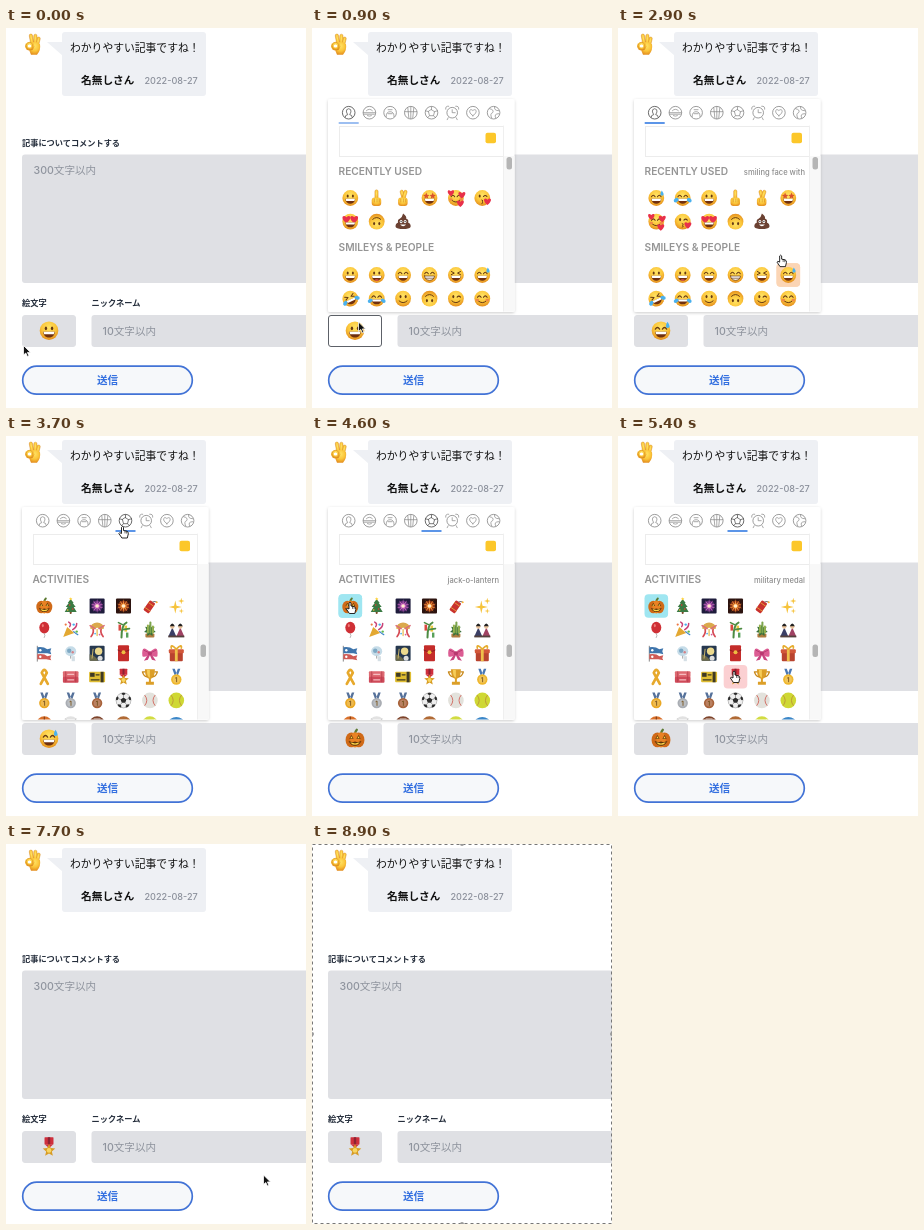
An HTML page for the animation above (9000 ms loop, 300 by 380 pixels).

```html
<!DOCTYPE html>
<html lang="ja">
<head>
<meta charset="utf-8">
<style>
html, body { margin: 0; width: 100%; height: 100%; overflow: hidden; background: #fff; }
svg { display: block; width: 300px; height: 380px; }
text { font-family: Inter, "Noto Sans CJK JP", "Noto Sans CJK", sans-serif; }
.medium { font-weight: 500; }
.bold { font-weight: 700; }
</style>
</head>
<body>
<svg id="stage" viewBox="0 0 300 380">
  <defs>
    <radialGradient id="skin" cx=".5" cy=".32" r=".7">
      <stop offset="0" stop-color="#ffe365"/><stop offset=".55" stop-color="#fbc539"/><stop offset="1" stop-color="#e28a1c"/>
    </radialGradient>
    <filter id="shadow" x="-10%" y="-10%" width="120%" height="120%">
      <feDropShadow dx="0" dy="1" stdDeviation="1.6" flood-opacity=".2"/>
    </filter>
    <clipPath id="panel"><rect x="16" y="71" width="187" height="212.5"/></clipPath>
  </defs>
  <path d="M41 14H57V28Z" fill="#eef0f4"/>
  <rect x="56" y="4" width="144" height="64" rx="3" fill="#eef0f4"/>
  <g id="ok"></g>
  <text class="medium" x="64" y="24" font-size="10.8" fill="#111">わかりやすい記事ですね！</text>
  <text class="bold" x="75" y="55.5" font-size="10.7" fill="#111">名無しさん</text>
  <text class="medium" x="138.5" y="55.5" font-size="9.1" fill="#8b909b">2022-08-27</text>
  <g class="bold" font-size="8.2" fill="#252e3c">
    <text x="16" y="118.3">記事についてコメントする</text>
    <text x="16" y="278.3">絵文字</text>
    <text x="85.5" y="278.3">ニックネーム</text>
  </g>
  <g fill="#dfe0e4">
    <rect x="16" y="126.5" width="300" height="128.5" rx="3"/>
    <rect x="85.5" y="287" width="230" height="32" rx="3"/>
  </g>
  <g class="medium" font-size="10.6" fill="#8f949e">
    <text x="27.5" y="146">300文字以内</text>
    <text x="96.5" y="306.5">10文字以内</text>
  </g>
  <rect id="field" x="16.5" y="287.5" width="53" height="31" rx="2.5"/>
  <g id="chosen"></g>
  <rect x="16.7" y="338.2" width="169.6" height="28" rx="14" fill="#f6f8fa" stroke="#4273d6" stroke-width="1.7"/>
  <text class="bold" x="101.5" y="356" font-size="10.6" fill="#3470e0" text-anchor="middle">送信</text>
  <g id="picker"></g>
  <g id="cursor"></g>
  <g id="selection" fill="#999">
    <rect x=".5" y=".5" width="299" height="379" fill="none" stroke="#777" stroke-dasharray="3 3"/>
    <circle cx="0" cy="190" r="2"/><circle cx="300" cy="190" r="2"/>
    <circle cx="150" cy="0" r="2"/><circle cx="150" cy="380" r="2"/>
  </g>
</svg>
<script>
const $ = id => document.getElementById(id);
const fill = (d, color) => `<path d="${d}" fill="${color}"/>`;
const line = (d, color, w = 1) =>
  `<path d="${d}" fill="none" stroke="${color}" stroke-width="${w}" stroke-linecap="round" stroke-linejoin="round"/>`;
const oval = (x, y, rx, color, ry = rx) => `<ellipse cx="${x}" cy="${y}" rx="${rx}" ry="${ry}" fill="${color}"/>`;
const box = (x, y, w, h, color, r = 1) =>
  `<rect x="${x}" y="${y}" width="${w}" height="${h}" rx="${r}" fill="${color}"/>`;
const turn = (deg, art) => `<g transform="rotate(${deg})">${art}</g>`;
const place = (art, x, y, s = 1) => `<g transform="translate(${x} ${y}) scale(${s})">${art}</g>`;
const heart = (x, y, s, color = '#e8304a') =>
  place(fill('M0 3C-5-1-2.5-4 0-1.5C2.5-4 5-1 0 3Z', color), x, y, s);
const spikes = (n, outer, inner) => 'M' + Array.from({ length: n * 2 }, (_, i) => {
  const a = i * Math.PI / n - Math.PI / 2, r = i % 2 ? inner : outer;
  return (r * Math.cos(a)).toFixed(2) + ' ' + (r * Math.sin(a)).toFixed(2);
}).join('L') + 'Z';
const star = (x, y, r, color, n = 5, inner = .45) => place(fill(spikes(n, r, r * inner), color), x, y);

const INK = '#653914', SKIN = 'url(#skin)', EDGE = '#d58a1f', GOLD = '#eaa824', BLUE = '#4ab1ee';
const eyes = {
  dot: oval(-2.6, -2, 1, INK, 1.6) + oval(2.6, -2, 1, INK, 1.6),
  arc: line('M-4.8-1.3q1.8-2.8 3.6 0M1.2-1.3q1.8-2.8 3.6 0', INK, 1.1),
  squint: line('M-4.6-3.5l3 1.6-3 1.5M4.6-3.5l-3 1.6 3 1.5', INK),
  wink: oval(-2.6, -2, 1, INK, 1.6) + line('M1.2-1.5q1.7-2 3.4 0', INK, 1.1),
  star: star(-3.2, -2, 3.4, '#d9532c') + star(3.2, -2, 3.4, '#d9532c'),
  heart: heart(-3.9, -2.4, 1.35) + heart(3.9, -2.4, 1.35),
};
const mouths = {
  grin: fill('M-5 .8H5C4.600 7.400-4.600 7.400-5 .8Z', '#70300f') + fill('M-4.700 .8H4.700L4.100 3H-4.100Z', '#fff'),
  teeth: fill('M-5 1H5C4.600 6.800-4.600 6.800-5 1Z', '#fff') + line('M-5 1H5C4.600 6.800-4.600 6.800-5 1ZM-4 3.200H4', INK, .7),
  smile: line('M-4 2.300Q0 6 4 2.300', INK),
  kiss: line('M-.5 2q2.500 .7 .2 1.700q2.400 .9-.2 1.900', INK, .9),
};
const face = (eye, mouth, extra = '') => oval(0, 0, 7.9, SKIN) + eyes[eye] + mouths[mouth] + extra;
const tears = turn(-35, oval(-6.600, -2, 2.600, BLUE, 1.900)) + turn(35, oval(6.600, -2, 2.600, BLUE, 1.900));
const blush = oval(-5, 1.5, 1.8, '#f08a45', 1.3) + oval(5, 1.5, 1.8, '#f08a45', 1.3);
const finger = (x, y, h) => `<rect x="${x}" y="${y}" width="3.200" height="${h}" rx="1.600" fill="${SKIN}" stroke="${EDGE}" stroke-width=".4"/>`;
const fist = box(-5, -.5, 9.5, 8.5, SKIN, 3) + line('M-2.300 1V4M.3 1V4M2.600 1.500V4', EDGE, .6);
const burst = (bg, glow, color) => box(-7.5, -7.5, 15, 15, bg, 1) + oval(0, 0, 5.5, glow) +
  star(0, 0, 7, color, 10, .3) + oval(0, 0, 1.8, '#ffeccb');
const medal = (ribbon, disc) => fill('M-4-8H-1.500L1-1H-1.500ZM4-8H1.500L-1-1H1.500Z', ribbon) +
  oval(0, 2.700, 5.200, disc) + oval(0, 2.700, 3.500, '#fff3') + line('M-.8 1.200L.3 .6V5', '#7a5520', .9);
const ball = (color, seam, d) => oval(0, 0, 7.8, color) + line(d, seam, .8);
const SEAMS = 'M-5-5Q-1 0-5 5M5-5Q1 0 5 5';
const PANELS = 'M0-3V-6M3-1L6-2M-3-1L-6-2M2 3L4 5M-2 3L-4 5';
const doll = (x, robe) => place(fill('M0-2L4 7H-4Z', robe) + oval(0, -3, 2.2, '#e9c29b') + fill('M-2.500-3.300Q0-9 2.500-3.300Z', '#222'), x, 0);

const emoji = {
  grinning: face('dot', 'grin'),
  smiley: face('dot', 'grin', oval(0, 5, 2, '#e8525a', .8)),
  smile: face('arc', 'grin'),
  beaming: face('arc', 'teeth'),
  laughing: face('squint', 'grin'),
  sweat: face('arc', 'grin', fill('M5.500-7.500Q9-2.500 5.700-2.200Q2.600-2.600 5.500-7.500Z', BLUE)),
  rolling: turn(-25, face('squint', 'grin', tears)),
  joy: face('arc', 'grin', tears),
  slight: face('dot', 'smile'),
  upside: turn(180, face('dot', 'smile')),
  wink: face('wink', 'smile'),
  blush: face('arc', 'smile', blush),
  starry: face('star', 'grin'),
  loved: face('arc', 'smile', blush + heart(-5, -5, 1.1) + heart(6, -3, 1.2) + heart(4.5, 5.5, 1.2)),
  kiss: face('wink', 'kiss', heart(5.2, 3.5, 1.2)),
  hearts: face('heart', 'grin'),
  finger: finger(-1.8, -8.2, 11) + fist,
  crossed: turn(-16, finger(-1.2, -8, 11)) + turn(18, finger(-1.2, -8.2, 11)) + fist,
  poo: fill('M0-8Q4-5 3-3Q6-2 5 1Q8 2 7.5 5.5Q6 7.5 0 7.5T-7.5 5.5Q-8 2-5 1Q-6-2-3-3Q-1-4 0-8Z', '#6b4132') +
    oval(-2, 0, 1.4, '#fff', 1.7) + oval(2, 0, 1.4, '#fff', 1.7) + oval(-2, 0, .7, '#222') + oval(2, 0, .7, '#222') + fill('M-3 3H3Q0 6.5-3 3Z', '#fff'),
  pumpkin: line('M0-4Q0-6 1.5-7.5', '#5c7a32', 2) + oval(-3, 1, 5, '#d06a18', 6.3) + oval(3, 1, 5, '#d06a18', 6.3) + oval(0, 1, 4, '#e98223', 6.5) +
    fill('M-4.800 0L-3-3.200L-1.200 0ZM4.800 0L3-3.200L1.200 0ZM-5.500 2L-2 3L0 2.400L2 3L5.500 2Q3 6.600 0 6Q-3 6.600-5.500 2Z', '#5a3208') +
    fill('M-4-.3L-3-2L-2-.3ZM4-.3L3-2L2-.3ZM-4 3L0 4L4 3Q2 5.800 0 5Q-2 5.800-4 3Z', '#ffd84a'),
  tree: box(-1, 5, 2, 3, '#7a4a28') + fill('M0-7L3-3H2L5 1H3L6 6H-6L-3 1H-5L-2-3H-3Z', '#3a7a43') + star(0, -7, 1.8, '#ffd33d') +
    oval(-1, -1, .8, '#e33') + oval(2, 3, .8, '#e33') + oval(-3, 4, .8, '#fb3'),
  fireworks: burst('#1e1c3c', '#5b2f72', '#d268c4'),
  sparkler: burst('#2c130f', '#8a3418', '#f7953a'),
  cracker: turn(35, box(-3.3, -5, 6.6, 12, '#c9322e', 1.2) + line('M-3-2H3M-3 4H3', '#e8a83a', .8) + line('M0-5Q1-7 3-7', '#777') + oval(3.5, -7, 1, '#ffb32e')),
  sparkles: star(-1, 1, 6.5, '#f6c33c', 4, .26) + star(5, -5, 3.2, '#f6c33c', 4, .3) + star(5, 5, 2.8, '#f6c33c', 4, .3),
  balloon: oval(0, -2, 5, '#cf3036', 5.8) + line('M0 4Q1.5 6 0 8', '#999', .7) + oval(-1.5, -4, 1, '#f07d7a', 1.6),
  popper: fill('M-7.500 7.500L-3.500-2.500L3.500 3.500Z', '#e3a832') + line('M-1-3Q1-6-2-7.500M2 0Q6-2 6-6', '#c94377', 1.5) +
    oval(3, -5, 1.2, BLUE) + oval(6, 2, 1.2, '#62b950') + oval(-5, -5, 1.1, '#e74') + line('M3 2Q5 4 7 5', '#3f86c9', 1.3),
  confetti: fill('M-7-1A7 6 0 0 1 7-1L3 0L0-2L-3 0Z', '#dba94c') + line('M-4 0Q-3 3-6 7M4 0Q3 3 6 7', '#d64b54', 1.7) +
    line('M-7-4L-2-1M7-4L2-1', '#dc6d78', 1.5) + line('M0 0V6', '#e9bd57', 1.3) + oval(-2, 4, .9, BLUE) + oval(2.5, 5, .9, '#d55a9a'),
  bamboo: line('M-2 8Q-2-5 3-7', '#4d8b42', 2) + box(-5, -5, 2.6, 6, '#d9483f', 0) + box(1, -4, 2.6, 6, '#e9c843', 0) + box(2.5, 3, 2.4, 5, '#58a05a', 0) + line('M-1 0L6-1M-1-5L-5-7', '#4d8b42', 1.6),
  pine: box(-4.5, 4, 9, 4, '#b07c40') + star(0, 1, 6, '#38703c', 7, .6) + box(-3, -5, 2, 9, '#93b04d') + box(-.5, -8, 2, 12, '#7da54d') + box(2, -4, 2, 8, '#93b04d'),
  dolls: doll(-4, '#3b3f66') + doll(4, '#a04263') + box(-8, 6, 16, 1.8, '#54413e', 0),
  streamer: line('M-7-7V8', '#888', 1) + fill('M-7-6Q-1-7 3-4L7-5L6-2L7 1L3 0H-7Z', '#3f75ac') + fill('M-7 1Q0 0 3 3L7 2L6 5L7 7L2 6H-7Z', '#cf5a55') + oval(-4, -3, 1.2, '#fff') + oval(-4, 3.5, 1.2, '#fff'),
  chime: oval(0, -2, 5.5, '#c6dce8', 5) + line('M0 3V5', '#888', .8) + box(1, 3, 3.2, 5, '#d5dfe5', 0) + oval(-1.5, -2.5, 2.2, '#7fa9c4') + oval(2, -1, 1.2, '#d3848a'),
  moon: box(-7.5, -7.5, 15, 15, '#26384f', 1) + oval(1.5, -2, 3.7, '#ecd98d') + fill('M-7.500 7.500V1Q-2 2 1 7.500Z', '#6d6b4a') + oval(3, 5, 2.5, '#ddd') + line('M-5 5L-4-4', '#c9b46a'),
  envelope: box(-5.5, -8, 11, 16, '#c42c2a') + line('M-5.500-3Q0 0 5.500-3', '#821b1e', .9) + oval(0, -1, 2, '#eebc42'),
  bow: fill('M0-1Q-9-10-7.500 3Q-5 5 0 1Q5 5 7.500 3Q9-10 0-1Z', '#dc5c93') + fill('M-1 0L-6 7.500L-2 6.500L0 2L2 6.500L6 7.500L1 0Z', '#c94480') + oval(0, 0, 2, '#b8386f') + line('M-6-3L-2-1M6-3L2-1', '#a93266', .7),
  gift: box(-6.5, -3, 13, 11, '#b9432f') + box(-7.5, -4, 15, 4, '#d2573a') + box(-1.4, -4, 2.8, 12, '#eec04b', 0) + line('M0-4Q-6-10-5-5M0-4Q6-10 5-5', '#e6ad30', 1.7),
  ribbon: line('M-3.5 7L2.5-4Q0-10-2.5-4L3.5 7', '#e7a92c', 2.7),
  tickets: box(-7.8, -5.5, 15.6, 6, '#de6a72') + box(-7.8, 0, 15.6, 6, '#cf4a59') + line('M-3-2.500H3M-3 3H3', '#f6bcc0', 1.2) + line('M-5-5V5M5-5V5', '#b23b4b', .7),
  ticket: box(-8, -5, 16, 10.5, '#dfbd32') + box(3.5, -5, 3, 10.5, '#3e3924', 0) + box(-7, -4, 4.5, 4, '#3e3924', 0) + line('M-1-2H2M-6 3H2', '#3e3924', 1.2),
  medal: box(-3.8, -8, 7.6, 6, '#cf2f3c', .5) + box(-1, -8, 2, 7, '#8b2333', 0) + fill('M-3.800-2L0 1L3.800-2Z', '#cf2f3c') + star(0, 3.2, 5.6, '#d79c24') + oval(0, 3.2, 2, '#f8d662'),
  trophy: fill('M-5-7.500H5Q5 1 1 2V5H4V8H-4V5H-1V2Q-5 1-5-7.500Z', '#dc9f28') + fill('M-3-7H0V1Q-3 0-3-7Z', '#f6cd58') + line('M-5-5H-7.500Q-6 0-3 0M5-5H7.500Q6 0 3 0', '#c98a1d', 1.3),
  sports: medal('#4a78b4', '#efb72e'),
  first: medal('#55719a', GOLD),
  second: medal('#55719a', '#a9adb3'),
  third: medal('#55719a', '#a8623a'),
  soccer: oval(0, 0, 7.8, '#999') + oval(0, 0, 7.3, '#eee') + star(0, 0, 3, '#2b2b2b', 5, .8) + line(PANELS, '#777', .7) +
    [0, 72, 144, 216, 288].map(a => turn(a, oval(0, -6.6, 2, '#2b2b2b', 1.1))).join(''),
  baseball: ball('#e3e2dc', '#cf554b', SEAMS),
  softball: ball('#cfd834', '#b98c38', SEAMS),
  basket: ball('#d9702a', '#5b2b17', 'M-7 0H7M0-7V7'),
  volley: ball('#e2e2e2', '#999', SEAMS),
  football: ball('#7d432a', '#fff', 'M-3-5H3'),
  rugby: ball('#b06a35', '#fff', 'M-3-4H3'),
  tennis: ball('#d2dc42', '#fff', SEAMS),
  disc: oval(0, -1, 7.8, '#3a86c8', 6),
};
const words = text => text.split(' ');
const recents = words('grinning finger crossed starry loved kiss hearts upside poo');
const people = words('grinning smiley smile beaming laughing sweat rolling joy slight upside wink blush');
const activities = words('pumpkin tree fireworks sparkler cracker sparkles balloon popper confetti bamboo pine dolls ' +
  'streamer chime moon envelope bow gift ribbon tickets ticket medal trophy sports ' +
  'first second third soccer baseball softball basket volley football rugby tennis disc');

// Category icons drawn inside a ring of radius 6
const tabArt = [
  'M-3.5 4.5Q-3.5 2-1 2Q-3-1-2-3Q0-5 2-3Q3-1 1 2Q3.5 2 3.5 4.5',
  'M-6 0H6M-5 1.500H5M-3-2Q0-5 3-2M-2 3Q0 4 2 3',
  'M-4 4Q-4-1 0-1T4 4M-2-3H2M-2 1H2',
  'M-6-1H6M-3-5L-2 5M3-5L2 5M0-6V6',
  'M0-3L3-1L2 3H-2L-3-1ZM0-3V-6' + PANELS.slice(5),
  'M0-3V0H3M-6.500-3.500Q-7-7-3.500-6.500M6.500-3.500Q7-7 3.500-6.500M-4 5L-5 7M4 5L5 7',
  'M0 3C-6-1-2.5-5 0-2C2.5-5 6-1 0 3Z',
  'M-4-4Q1-3-1 0Q-4 1-2 5M1-6Q0-2 5-2M2 5Q0 1 5 1',
];
const tabX = i => 36.7 + i * 20.7;
const columnColors = ['#9fe6f1', '#b9ec9d', '#fbe79a', '#fbd0d2', '#e3cdf5', '#fbd5b5'];
const cellX = c => 38.3 + c * 26.4;
const grid = (names, top) => names.map((n, i) =>
  place(emoji[n], cellX(i % 6), top + Math.floor(i / 6) * 23.6)).join('');
const glow = cell => cell ? box(cellX(cell[0]) - 11.8, cell[1] - 11.8, 23.6, 23.6, columnColors[cell[0]], 4) : '';
const heading = (s, y) =>
  `<text x="26.500" y="${y}" font-size="10.2" font-weight="600" fill="#959595">${s}</text>`;

function pickerArt(s) {
  if (!s.open) return '';
  const tabs = tabArt.map((d, i) => {
    const color = i === s.tab ? '#444' : '#858585', r = i === 5 ? 5.3 : 6.3;
    return place(`<circle r="${r}" fill="none" stroke="${color}" stroke-width=".8"/>` + line(d, color, .7), tabX(i), 84.7);
  }).join('');
  const list = s.tab
    ? heading('ACTIVITIES', 147) + glow(s.focus) + glow(s.hover) + grid(activities, 170)
    : heading('RECENTLY USED', 147) + heading('SMILEYS &amp; PEOPLE', 223) + glow(s.focus) + glow(s.hover) +
      grid([...s.recent, ...recents], 170) + grid(people, 247);
  return `<rect x="16" y="71" width="186.500" height="213" rx="2" fill="#fff" filter="url(#shadow)"/>
    <g clip-path="url(#panel)">${tabs}
    <rect x="${tabX(s.tab) - 10}" y="94" width="20" height="2" fill="#5c95e8" opacity="${s.settled ? 1 : .6}"/>
    <rect x="27.5" y="98.5" width="164" height="30" fill="#fff" stroke="#ececec"/>
    ${box(191.5, 128, 11, 156, '#f8f8f8', 0)}${line('M191.500 98V284', '#efefef')}${box(173.5, 104.8, 10.5, 10.5, '#fcc72a', 2)}
    ${box(194.5, s.tab ? 208.5 : 129, 5.5, 12.5, '#b5b5b5', 2.5)}
    <text class="medium" x="187" y="147" text-anchor="end" font-size="7.6" fill="#8c8c8c">${s.label}</text>${list}</g>`;
}

const joy = [1, 270.6], sweat = [5, 247], pumpkin = [0, 170], military = [3, 240.8];
const start = { pick: 'grinning', tab: 0, recent: [], label: '' };
const steps = [
  [700, { active: true }],
  [800, { open: true }],
  [1000, { settled: true }],
  [1600, { hover: joy, label: 'face with tears of' }],
  [1700, { active: false, pick: 'joy', focus: joy, recent: ['joy'] }],
  [2100, { hover: [2, 270.6], label: 'slightly smiling' }],
  [2400, { hover: sweat, label: 'smiling face with' }],
  [2800, { pick: 'sweat', focus: sweat, recent: ['sweat', 'joy'] }],
  [3000, { hover: null, label: '' }],
  [3400, { tab: 4, focus: null }],
  [4200, { hover: pumpkin, label: 'jack-o-lantern' }],
  [4500, { pick: 'pumpkin', focus: pumpkin }],
  [4900, { hover: null, label: '' }],
  [5200, { hover: military, label: 'military medal' }],
  [5600, { pick: 'medal', focus: military }],
  [5800, { hover: null, label: '' }],
  [6300, { open: false }],
];
const path = [
  [0, 17.5, 317.5], [600, 46.5, 294], [1000, 46.5, 294], [1500, 65, 266], [1800, 65, 266], [2000, 86, 265.5],
  [2500, 168, 243], [2800, 168, 243], [3300, 116.5, 90.5], [3700, 116.5, 90.5], [4200, 38, 166], [4700, 38, 166],
  [5200, 116, 235], [5600, 116, 235], [6200, 263, 333], [6500, 257.5, 331], [8100, 257.5, 331], [8500, 310, -20],
];
const arrow = '<path d="M0 0V9.5L2.3 7.5L3.9 11L5.4 10.3L3.9 6.9H7Z" fill="#111" stroke="#fff" stroke-width=".8"/>';
const hand = '<path d="M-1 .8Q0-.8 1 .8V4L4.4 4.7Q6 5.2 5.8 7.4L4.8 11.5H-.6L-3.6 7Q-3.3 5.3-1 7Z" fill="#fff" stroke="#111" stroke-width=".9"/>' +
  line('M2.5 4.5V6.5M4.1 4.9V6.7', '#111', .6);

function cursorAt(t) {
  const i = path.findIndex(p => p[0] > t);
  if (i < 0) return path[path.length - 1].slice(1);
  const [t0, x0, y0] = path[i - 1], [t1, x1, y1] = path[i];
  const u = (t - t0) / (t1 - t0), e = u * u * (3 - 2 * u);
  return [x0 + (x1 - x0) * e, y0 + (y1 - y0) * e];
}

let shown = -1;
function draw(t) {
  const done = steps.filter(s => s[0] <= t);
  const state = Object.assign({}, start, ...done.map(s => s[1]));
  if (done.length !== shown) {
    shown = done.length;
    $('picker').innerHTML = pickerArt(state);
    $('chosen').innerHTML = place(emoji[state.pick], 43, 302.7, 1.18);
    $('field').setAttribute('fill', state.active ? '#fff' : '#dfe0e4');
    $('field').setAttribute('stroke', state.active ? '#5d6168' : '#dfe0e4');
  }
  const [x, y] = cursorAt(t);
  const clickable = state.open && x > 24 && x < 188 && (y > 77 && y < 97 || y > 157 && y < 283);
  $('cursor').innerHTML = place(clickable ? hand : arrow, x, y);
  $('selection').style.display = t >= 8800 ? '' : 'none';
}

$('ok').innerHTML = place(
  turn(14, finger(2.5, -8.5, 13)) + turn(2, finger(.5, -10.2, 13)) + turn(-10, finger(-2.2, -10.5, 13)) +
  fill('M-3-1Q4-4 7 0Q8 6 4 10.5H-2Q-4 7-4 3Z', SKIN) + oval(-3.3, 2, 4.6, SKIN, 4.2) +
  line('M-1 5Q1-2-3.5-2Q-8-1-6.5 3Q-5 6-1 5', EDGE, .6) + oval(-3.5, 1.8, 1.8, '#fff', 1.5), 27, 16.3);

function tick(now) {
  draw(Math.floor(now % 9000 / 100) * 100);
  requestAnimationFrame(tick);
}
draw(0);
requestAnimationFrame(tick);
</script>
</body>
</html>
```
